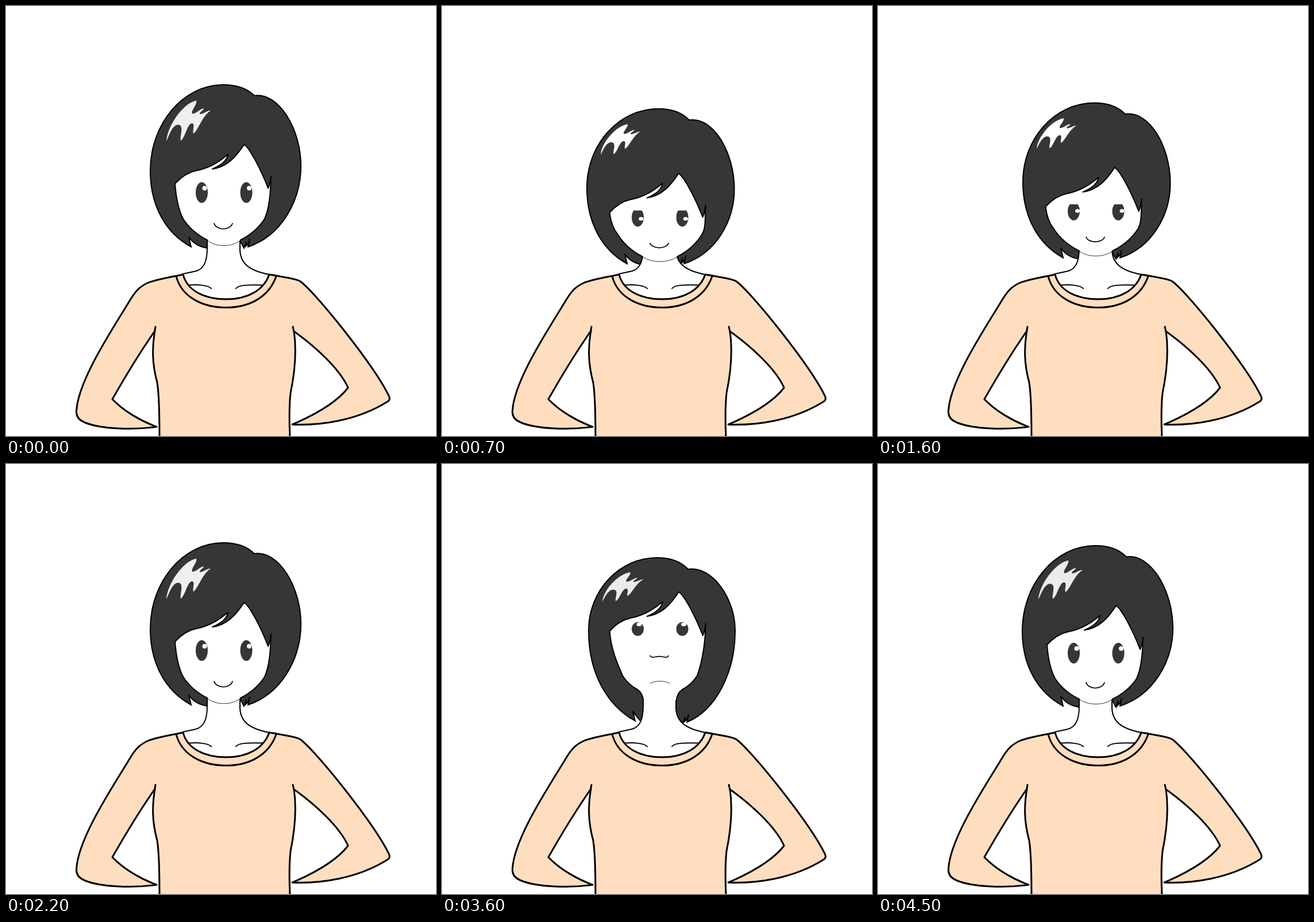
An HTML page that plays this animation: 748x748 px, repeating every 5 s.

```html
<!DOCTYPE html>
<html lang="en">
<head>
<meta charset="utf-8">
<title>Nodding and looking up</title>
<style>
  html, body { margin: 0; width: 100%; height: 100%; overflow: hidden; background: #fff; }
  svg { display: block; width: 100%; height: 100%; }
  .line { fill: none; stroke: #000; stroke-width: 2; stroke-linecap: round; stroke-linejoin: round; }
  .hair { fill: #363636; stroke-linejoin: miter; }
  .skin { fill: #fff; }
  .seam { stroke-width: 3; }
  .cloth { fill: #ffdebf; }
  .thin { stroke-width: .8; }
  .lips { stroke-width: 1.7; }
</style>
</head>
<body>
<svg viewBox="0 0 748 748">
  <path id="hair" class="line hair"/>
  <path id="shine" d="M279 235C281 208 308 169 331 164.500C333 172 321 182 324 187.500C332 187 337 179 344 178C344 182 336 184 337 188C344 188 350 181 356 182C342 190 334 217 326 222C324 216 330 204 323 204C315 206 311 231 304 234C302 226 311 207 299 206.500C288 208 283 228 279 235Z"/>
  <path class="line skin" d="M320 515L308 466L331 461C344 457 350 445 350 420V395H407V425C408 449 424 460 457 467L445 515"/>
  <path id="face" class="skin"/>
  <path id="edge" class="line"/>
  <path id="chin" class="line thin"/>
  <g id="eyes"></g>
  <path id="mouth" class="line lips"/>
  <path class="line seam cloth" d="M308 467C285 472 265 475 248 481C232 488 225 497 218 508C190 555 125 650 122.500 705C122 715 129 721 136 724C163 736 222 738 262 732C235 722 205 705 185 684C202 654 232 604 259 565C254 595 254 622 263 655C267 680 267 720 267 752H494C493 730 492 700 495 673C504 630 505 595 501 566C535 590 580 630 595 664C575 690 540 710 498 728C545 730 610 722 664 688C668 685 668 683 666 678C640 625 540 500 512 479C505 474 480 471 458 467C448 495 420 510 383 510C345 510 315 495 308 467Z"/>
  <path class="line seam" d="M296 470C305 505 340 524.500 383 524.500C425 524.500 458 505 470 470M260 558L258.500 567M499 558L501 567"/>
  <path class="line" d="M318 485.500C335 484 352 486 357 491.500M400 491.500C405 485 420 485 446 485.500"/>
</svg>
<script>
const $ = id => document.getElementById(id);
const AXIS = 379;

// Hair: top, notch, sides (left, right), tips (bl, br). Fringe offset, jaw (j), jaw end (n), curl to neck (k).
// Shine: position, scale, grey. Eyes: centre, radius, lid, glint. Chin and mouth.
const rest = {
  top: 137, notchX: 432, notchY: 156, lx: 251, ly: 287, rx: 513, ry: 278,
  blX: 322, blY: 419, brX: 421, brY: 419, tipX: 350,
  fx: 0, fy: 0, jx: 308, jy: 370, nx: 350, ny: 407, kx: 0, ky: 0,
  hx: 279, hy: 235, hw: 1, hh: 1, grey: 239,
  ey: 324.5, er: 18, lid: 304, gx: 5, gy: 317, gw: 4, gh: 4,
  cw: 29, cy: 407.5, cd: 12.5, my: 378, m1: 6.5, m2: 9.75
};
const lowering = { ...rest,
  top: 155.5, notchX: 431, notchY: 175.5, lx: 252, ly: 296, rx: 511, ry: 297,
  blY: 428, brY: 428, fx: -1.2, fy: 27, jx: 307, jy: 377, ny: 416,
  hx: 277, hy: 242, hw: .9, hh: .85, grey: 255,
  ey: 339, er: 17, lid: 326, gy: 333, gh: 3.7,
  cy: 416, cd: 11, my: 387, m1: 5.8, m2: 8.7
};
const down = { ...lowering,
  top: 168.5, notchX: 430, notchY: 188, ly: 306, rx: 508.5, ry: 308,
  blY: 438, brY: 438, fx: -2.5, fy: 40, jx: 306, jy: 388, ny: 426,
  hx: 276, hy: 248, hh: .75,
  ey: 357, er: 16, lid: 345, gx: 6.5, gy: 356.5, gh: 3.2,
  cy: 426, cd: 12, my: 402, m1: 5.4, m2: 8.2
};
const bowed = { ...down };
for (const key of ['top', 'notchY', 'ly', 'ry', 'blY', 'brY', 'fy', 'hy']) bowed[key] += 31;
Object.assign(bowed, {
  jy: 417, nx: 345, ny: 455, ey: 389, lid: 377, gx: 4.5, gy: 397.5,
  cw: 34, cy: 455, cd: 12, my: 434, m1: 4.8, m2: 7.2
});
const up = { ...rest,
  top: 163, notchX: 428, notchY: 183, lx: 255, ly: 290, rx: 510, ry: 290,
  blX: 336, blY: 447, brX: 426, brY: 449, tipX: 348,
  fx: -2.3, fy: -18.5, jx: 314, jy: 368, nx: 341, ny: 393, kx: 9, ky: 18,
  hy: 239, hw: .93, hh: .72, grey: 235,
  ey: 287, er: 12, gx: 2.5, gy: 279, gw: 4.5, gh: 3.2, lid: 273,
  cw: 17, cy: 381.5, cd: -5, my: 333.5, m1: 5, m2: 1.2
};
const settled = { ...rest,
  top: 142, notchY: 161.5, ly: 291, ry: 285, blY: 421, brY: 421,
  fy: 5.5, jy: 373, ny: 409, hy: 235.5, hh: .96, grey: 235,
  ey: 329, lid: 311, gy: 321, cy: 409, cd: 11.5, my: 380
};

const STEP = 100, LOOP = 5000;
const moves = [
  [100, rest, lowering, 3], [400, lowering, down, 2],
  [700, down, bowed, 3], [1400, bowed, down, 3],
  [1800, down, lowering, 2], [2000, lowering, rest, 3],
  [3200, rest, up, 5], [4100, up, settled, 5]
];

function poseAt(time) {
  const move = moves.filter(m => m[0] <= time).pop();
  if (!move) return rest;
  const [start, from, to, steps] = move;
  const k = Math.min(1, (Math.floor((time - start) / STEP) + 1) / steps);
  const pose = {};
  for (const key in from) pose[key] = from[key] + (to[key] - from[key]) * k;
  return pose;
}

function hairPath(p) {
  const mid = p.notchX - 54, dl = p.blY - p.ly, dr = p.brY - p.ry;
  return `M${p.notchX} ${p.notchY}C${p.notchX - 12} ${p.top + 7} ${mid + 24} ${p.top} ${mid} ${p.top}
    C${mid - .55 * (mid - p.lx)} ${p.top} ${p.lx} ${p.ly - .55 * (p.ly - p.top)} ${p.lx} ${p.ly}
    C${p.lx} ${p.ly + .48 * dl} ${p.blX - .59 * (p.blX - p.lx)} ${p.blY - .17 * dl} ${p.blX} ${p.blY}
    l-4 -17Q${p.blX + 7} ${p.blY - 1} ${p.tipX} ${p.blY + 2}
    L350 ${p.blY - 17}L408 ${p.brY - 9}L${p.brX - 7} ${p.brY + 2}l4 -11l-1 8q6 -5 7 -13
    L${p.brX} ${p.brY}C${p.brX + .62 * (p.rx - p.brX)} ${p.brY - .135 * dr} ${p.rx} ${p.ry + .44 * dr} ${p.rx} ${p.ry}
    C${p.rx} ${p.ry - .516 * (p.ry - p.notchY)} ${p.notchX + 43} ${p.notchY - 6} ${p.notchX} ${p.notchY}Z`;
}

// Runs from the left jaw end over the fringe to the right jaw end.
function facePath(p) {
  const at = (x, y) => `${x + p.fx} ${y + p.fy} `;
  const flip = x => 2 * AXIS - x;
  const { jx, jy, nx, ny, kx, ky } = p;
  const dx = nx - jx, dy = ny - jy;
  const left = jy - 309 - p.fy, right = jy - 296 - p.fy;
  const kX = nx + kx, kY = ny + ky;
  return `M${kX} ${kY}C${kX} ${kY - .4 * ky} ${nx + .55 * kx} ${ny + .2 * ky} ${nx} ${ny}
    C${nx - .38 * dx} ${ny - .22 * dy} ${jx + .24 * dx} ${jy + .43 * dy} ${jx} ${jy}
    C${jx - 7} ${jy - .22 * left} ${296 + p.fx} ${309 + p.fy + .42 * left} ${at(294, 309)}
    C${at(305, 297)}${at(316, 289.5)}${at(330, 286.5)}C${at(350, 283)}${at(368, 274)}${at(386, 258)}
    C${at(384, 270)}${at(374, 277)}${at(359, 283.5)}C${at(384, 280)}${at(400, 263)}${at(414, 241)}
    C${at(423, 246)}${at(442, 281)}${at(456, 317)}Q${at(460, 308)}${at(461, 296)}
    C${460 + p.fx} ${296 + p.fy + .5 * right} ${flip(jx - 7)} ${jy - .22 * right} ${flip(jx)} ${jy}
    C${flip(jx + .24 * dx)} ${jy + .43 * dy} ${flip(nx - .38 * dx)} ${ny - .22 * dy} ${flip(nx)} ${ny}
    C${flip(nx + .55 * kx)} ${ny + .2 * ky} ${flip(kX)} ${kY - .4 * ky} ${flip(kX)} ${kY}`;
}

const arc = (w, y, depth) =>
  `${AXIS - w} ${y}C${AXIS - w * .5} ${y + depth} ${AXIS + w * .5} ${y + depth} ${AXIS + w} ${y}`;

// The lid covers only the part of the eye above its edge.
function eye(x, p) {
  const top = p.ey - p.er - 1;
  return `<ellipse cx="${x}" cy="${p.ey}" rx="10.5" ry="${p.er}" fill="#363636"/>
    <ellipse cx="${x + p.gx}" cy="${p.gy}" rx="${p.gw}" ry="${p.gh}" fill="#fff"/>
    <rect x="${x - 11}" y="${top}" width="22" height="${Math.max(0, p.lid - top)}" fill="#fff"/>`;
}

function draw(p) {
  const face = facePath(p);
  $('hair').setAttribute('d', hairPath(p));
  $('shine').setAttribute('transform', `translate(${p.hx} ${p.hy}) scale(${p.hw} ${p.hh}) translate(-279 -235)`);
  $('shine').setAttribute('fill', `rgb(${p.grey},${p.grey},${p.grey})`);
  const end = p.nx + p.kx, low = p.ny + p.ky + Math.max(0, p.cd);
  $('face').setAttribute('d', `${face}C${AXIS + 14} ${low} ${AXIS - 14} ${low} ${end} ${p.ny + p.ky}Z`);
  $('edge').setAttribute('d', face);
  $('chin').setAttribute('d', 'M' + arc(p.cw, p.cy, p.cd));
  $('eyes').innerHTML = eye(340.5, p) + eye(418, p);
  const { my, m1, m2 } = p;
  $('mouth').setAttribute('d', `M362 ${my}C364 ${my + m1} 371 ${my + m2} 378 ${my + m2}S392 ${my + m1} 394 ${my}`);
}

function tick() {
  draw(poseAt(performance.now() % LOOP));
  requestAnimationFrame(tick);
}
tick();
</script>
</body>
</html>
```
